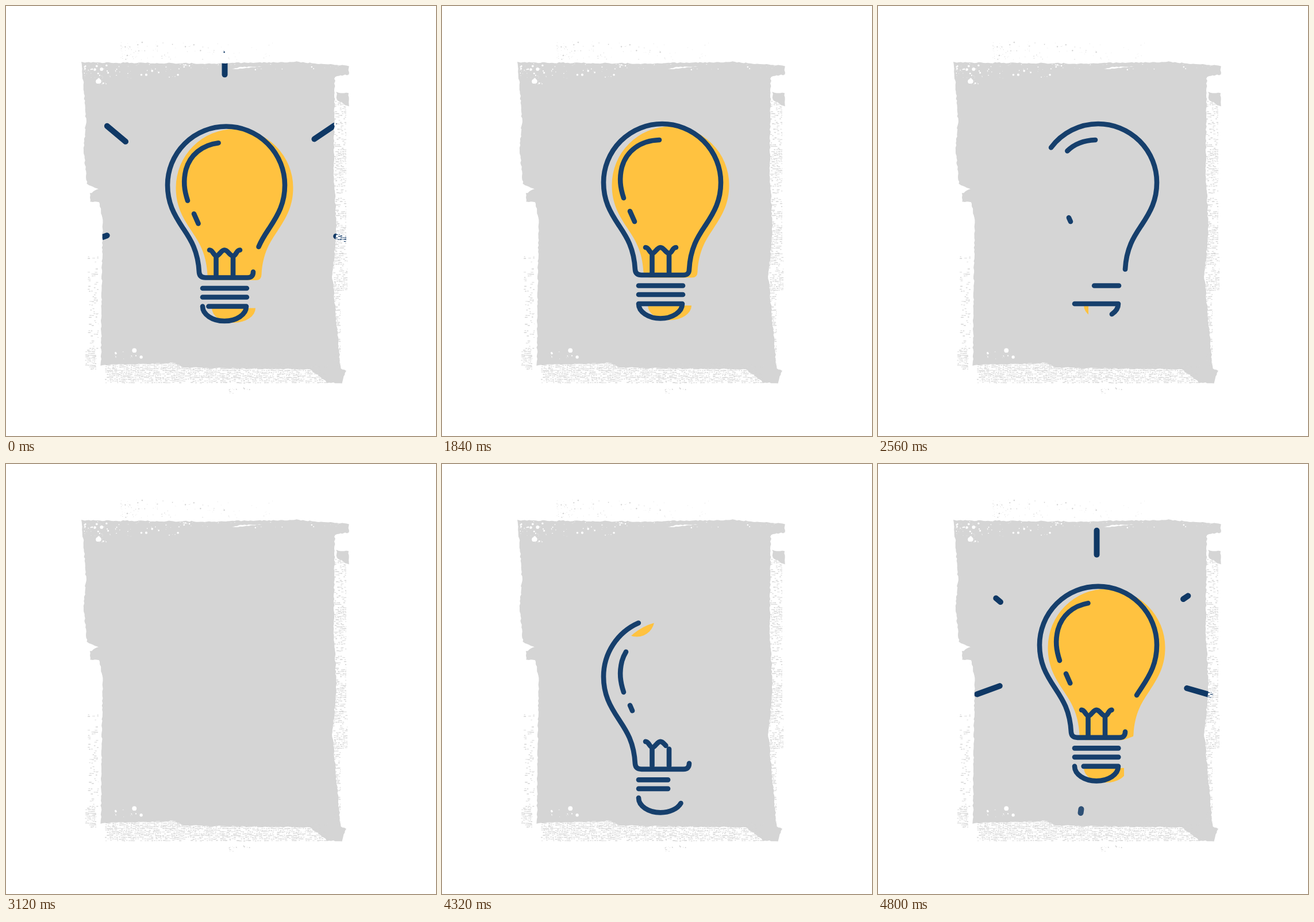
Recreate the animation shown at these times as an HTML page with a canvas. Size 748 by 748 pixels, loop 4.88 s.

```html
<!DOCTYPE html>
<html lang="en">
<head>
<meta charset="utf-8">
<title>Light bulb</title>
<style>
html, body { margin: 0; width: 100%; height: 100%; overflow: hidden; background: #fff; }
canvas { display: block; width: 748px; height: 748px; }
</style>
</head>
<body>
<canvas id="stage" width="748" height="748"></canvas>
<script>
const SIZE = 748, LOOP = 4880, STEP = 80;
const ERASE = 1840, BLANK = 3120, DRAW = 4000;
const GRAY = '#d5d5d5', NAVY = '#163f6c', RAY = '#0f3865', YELLOW = '#ffc240';
const ctx = document.getElementById('stage').getContext('2d');

const clamp = v => Math.min(1, Math.max(0, v));
const span = (t, a, b) => clamp((t - a) / (b - a));
const smooth = u => u * u * (3 - 2 * u);
const easeOut = u => 1 - (1 - u) ** 3;

let seed = 7;
function rnd() {
  seed = (seed + 0x6d2b79f5) | 0;
  let r = Math.imul(seed ^ (seed >>> 15), 1 | seed);
  r = (r + Math.imul(r ^ (r >>> 7), 61 | r)) ^ r;
  return ((r ^ (r >>> 14)) >>> 0) / 4294967296;
}

// ---- worn paper panel ----
function makePanel() {
  const cv = document.createElement('canvas');
  cv.width = cv.height = SIZE;
  const g = cv.getContext('2d');

  // polygon with a torn edge
  function torn(text, jitter = 2) {
    const pts = text.split(' ').map(p => p.split(',').map(Number));
    g.beginPath();
    pts.forEach(([x, y], i) => {
      const [u, v] = pts[(i + 1) % pts.length];
      const n = Math.ceil(Math.hypot(u - x, v - y) / 4);
      for (let k = 0; k < n; k++) {
        g.lineTo(x + (u - x) * k / n + (rnd() - .5) * jitter,
                 y + (v - y) * k / n + (rnd() - .5) * jitter);
      }
    });
    g.fill();
  }
  // woven rows of short dashes, denser in some bands
  function weave(x, y, w, h, density) {
    for (let r = 0; r < h; r += 3) {
      const fill = density * (1 + .35 * Math.sin((y + r) / 19));
      for (let c = rnd() * 4; c < w; c += 4) {
        if (rnd() < fill) g.fillRect(x + c, y + r + rnd(), Math.min(2 + rnd() * 3, w - c), .8 + rnd() * .9);
      }
    }
  }
  // round flecks, crowded towards the left
  function flecks(x, y, w, h, n, size) {
    for (; n > 0; n--) {
      g.beginPath();
      g.arc(x + w * rnd() ** 2, y + h * rnd(), .4 + size * rnd() ** 4, 0, 7);
      g.fill();
    }
  }

  g.fillStyle = GRAY;
  torn('132,98 350,100 505,97 596,104 596,119 572,123 570,290 575,385 568,470 582,630 591,634 ' +
    '584,656 558,655 530,632 312,629 290,621 165,625 168,372 162,341 147,341 146,326 160,318 141,310 135,250 139,200');
  torn('575,150 596,152 596,175 575,163');
  weave(570, 165, 22, 265, .55);
  weave(568, 430, 26, 65, .75);
  weave(570, 495, 12, 130, .5);
  weave(141, 432, 20, 165, .26);
  weave(137, 597, 20, 35, .6);
  weave(172, 621, 388, 35, .66);
  flecks(200, 62, 285, 32, 110, .9);
  flecks(388, 664, 44, 10, 18, .8);

  g.fillStyle = '#fff';
  flecks(136, 100, 170, 26, 75, 2.6);
  flecks(160, 127, 16, 10, 9, 3.6);
  flecks(300, 101, 290, 10, 40, 1);
  flecks(190, 598, 70, 16, 14, 4);
  torn('392,110 408,106 444,105 418,108', 1);
  return cv;
}
const panel = makePanel();

// ---- bulb ----
const BODY = 'M430 458Q430 468 420 468H347Q337 468 336 459C334 420 320 400 308 382' +
  'C292 358 281 338 281 307A102 102 0 0 1 485 307C485 338 474 358 458 382C446 400 432 420 430 458';
const BOWL = 'M342 518A38 25.5 0 0 0 418 518H342';
const bodyShape = new Path2D(BODY), bowlShape = new Path2D(BOWL);

// how long a stroke takes to draw, and when it is wiped away
const frameStroke = { draw: 1424, from: 2130, to: 3060 };
const glintStroke = { draw: 1424, from: ERASE, to: 3080 };
const coreStroke = { draw: 1000, from: ERASE, to: 2560 };

const strokes = [
  [BODY, frameStroke],
  [BOWL, frameStroke],
  ['M342 486.5H419', { ...frameStroke, draw: 1000 }],
  ['M342 502H419', coreStroke],
  ['M316 334C310 316 308 300 313 280C321 252 345 234 378 233', glintStroke],
  ['M327 357L335 375', glintStroke],
  ['M354 420C360 420 361 430 366 430S374 420 380 420S389 430 395 430S400 420 407 420', coreStroke],
  ['M365.5 433V466', { ...coreStroke, draw: 600 }],
  ['M395 433V466', { ...coreStroke, draw: 600 }]
].map(([d, timing]) => {
  const el = document.createElementNS('http://www.w3.org/2000/svg', 'path');
  el.setAttribute('d', d);
  return { shape: new Path2D(d), len: el.getTotalLength(), ...timing };
});

// ---- rays: a dash slides outwards from its base ----
const DASH = 42, SPEED = .48, REACH = 80, FIRST = 4712, SECOND = 4779;

function drawRay(t, x, y, degrees, start, reach = REACH) {
  const run = (t - start) * SPEED, head = Math.min(run, reach), tail = Math.max(0, run - DASH);
  if (run <= 0 || tail >= reach) return;
  const a = degrees * Math.PI / 180, c = Math.cos(a), s = Math.sin(a);
  ctx.globalAlpha = clamp((reach - tail) / 8);
  ctx.beginPath();
  ctx.moveTo(x + c * tail, y + s * tail);
  ctx.lineTo(x + c * head, y + s * head);
  ctx.stroke();
  ctx.globalAlpha = 1;
}

function drawRays(t) {
  ctx.strokeStyle = RAY;
  ctx.lineWidth = 10;
  drawRay(t, 380.5, 158, -90, FIRST);
  drawRay(t, 212, 386, 160, FIRST);
  drawRay(t, 537, 390, 16, FIRST);
  drawRay(t, 353.5, 600, 98, FIRST, 7);
  drawRay(t, 213, 240, -140, SECOND);
  drawRay(t, 531, 235, -34, SECOND);
}

function fillIn(shape, dx, dy, clip) {
  ctx.save();
  ctx.beginPath();
  clip();
  ctx.clip();
  ctx.translate(dx, dy);
  ctx.fill(shape);
  ctx.restore();
}

function drawFill(t, drawing) {
  ctx.fillStyle = YELLOW;
  const bowl = drawing ? span(t, 4560, 4840) : 1 - span(t, 2260, 2600);
  fillIn(bowlShape, 16, 3, () => ctx.rect(356, 500, 84 * bowl, 60));

  fillIn(bodyShape, 14.5, 4.5, () => {
    if (drawing) {
      const p = span(t, 4280, 4840);
      if (p > 0) ctx.arc(339, 207, 10 + 290 * p, 0, 7);
    } else {
      const e = smooth(span(t, ERASE, 2640));
      if (e < 1) ctx.roundRect(250, 150, 255 - 200 * e, 328 - 290 * e, [0, 0, 72 * Math.min(e, .5), 0]);
    }
  });
}

function drawStrokes(t, drawing) {
  ctx.strokeStyle = NAVY;
  ctx.lineWidth = 8.6;
  for (const { shape, len, draw, from, to } of strokes) {
    const head = drawing ? easeOut(span(t, DRAW + 16, DRAW + 16 + draw)) : 1;
    const tail = drawing ? 0 : smooth(span(t, from, to));
    if (tail >= 1) continue;
    ctx.setLineDash([(head - tail) * len + .05, len * 2]);
    ctx.lineDashOffset = -tail * len;
    ctx.stroke(shape);
  }
  ctx.setLineDash([]);
}

function frame() {
  // the cycle is counted from the moment the wipe begins
  let t = Math.floor(performance.now() % LOOP / STEP) * STEP;
  if (t < ERASE) t += LOOP;
  const drawing = t >= DRAW;

  ctx.clearRect(0, 0, SIZE, SIZE);
  ctx.lineCap = ctx.lineJoin = 'round';
  ctx.drawImage(panel, 0, 0);
  ctx.globalCompositeOperation = 'source-atop';
  drawRays(t);
  ctx.globalCompositeOperation = 'source-over';

  if (drawing || t < BLANK) {
    ctx.save();
    if (drawing) ctx.translate(0, 149 * (1 - easeOut(span(t, DRAW, 5280))));
    drawFill(t, drawing);
    drawStrokes(t, drawing);
    ctx.restore();
  }
  requestAnimationFrame(frame);
}
frame();
</script>
</body>
</html>
```
